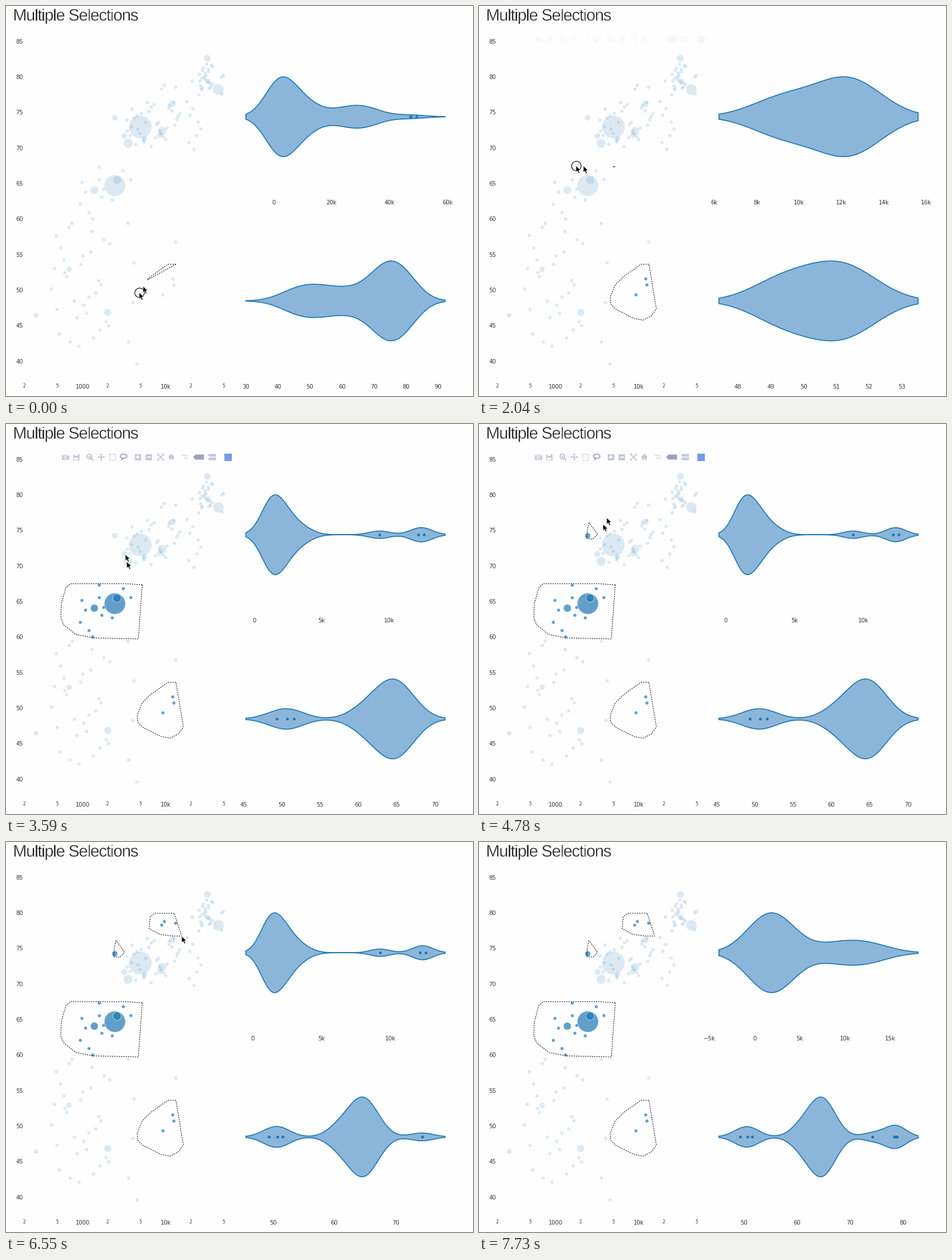
Recreate the animation shown at these times as a matplotlib script. Size 819 by 684 pixels, loop 8.37 s.

```python
import numpy as np
import matplotlib.pyplot as plt
from matplotlib.animation import FuncAnimation
from matplotlib.collections import PatchCollection
from matplotlib.patches import Circle, Ellipse, PathPatch, Polygon, Rectangle
from matplotlib.path import Path
from matplotlib.textpath import TextPath
from matplotlib.transforms import Affine2D, Bbox

W, H, LOOP, FRAMES = 819, 684, 8370, 186
TICK = LOOP // FRAMES
BG, INK, BLUE = "#fefefe", "#333333", "#1f77b4"
SLATE, ACCENT = "#444e84", "#6f96e0"
LEFT, RIGHT, HALF = 420.7, 770, 70   # violin extent
EDGE0, EDGE1 = 402, 789              # violin axis extent

# The screen refreshes in bursts of even steps.
BURSTS = [(0, 120), (270, 740), (1090, 1810), (1930, 2760), (2880, 3710),
          (3830, 4660), (4780, 5600), (5720, 6310), (6550, 6780), (7020, 7730)]
STEPS = np.concatenate([np.linspace(a, b, round((b - a) / 118) + 1)
                        for a, b in BURSTS])

# ---- data: income (k), life expectancy, radius ----
BUBBLES = [(4.959, 72.96, 20), (2.452, 64.698, 18.5), (2.606, 65.483, 7.3),
           (1.391, 64.062, 6.8), (42.95, 78.24, 9.4), (3.541, 70.65, 8),
           (9.066, 72.39, 7.3), (31.66, 82.6, 6), (11.98, 76.2, 5.6),
           (3.19, 71.69, 5.2), (2.442, 74.249, 5), (2.014, 46.86, 6.3),
           (.691, 52.95, 4.7), (32.17, 79.4, 4.8), (.278, 46.46, 4.2),
           (8.458, 71.78, 4.6), (5.581, 71.34, 4.6)]
SMALL = [(9.27, 49.339), (12.154, 51.579), (12.57, 50.728), (.944, 62.069),
         (.986, 65.152), (1.091, 63.785), (1.202, 60.916), (1.328, 60.022),
         (1.593, 67.297), (1.598, 65.528), (1.713, 63.062), (1.803, 64.164),
         (2.281, 62.698), (3.096, 66.803), (3.822, 65.554), (8.948, 78.273),
         (9.645, 78.782), (13.172, 78.553), (13.206, 56.735), (4.513, 39.613),
         (47.14, 79.97), (47.31, 77.59), (49.36, 80.2)]
# Count, life span, log10 income span.
CLOUDS = [(31, 42.1, 59.4, -.38, .34), (4, 42.7, 59.4, .52, .64),
          (21, 70.2, 76.4, .52, .9), (14, 71.2, 76.4, .9, 1.18),
          (11, 69.8, 79.4, 1.25, 1.45), (21, 78.2, 81.8, 1.4, 1.57)]
rng = np.random.default_rng(7)


def cloud(n, low, high, poor, rich):
    spread = (rng.permutation(n) + rng.random(n)) / n
    return np.c_[10 ** (poor + (rich - poor) * spread),
                 np.linspace(low, high, n), np.full(n, 3)]


DATA = np.vstack([BUBBLES, [(*p, 3) for p in SMALL]] + [cloud(*c) for c in CLOUDS])
GDP, LIFE, RADIUS = DATA.T
XY = np.c_[134 + 146 * np.log10(GDP), 62 + 12.467 * (85 - LIFE)]

# ---- lassos: press, release, leave, corners ----
LASSOS = [
    (-440, 600, 1100, [(298, 453), (284, 453), (253, 475), (239, 489), (230, 511),
                       (231, 523), (240, 532), (272, 548), (288, 551), (303, 543),
                       (311, 531)]),
    (1905, 2615, 2985, [(239, 282), (208, 280), (113, 280), (105, 287), (97, 315),
                        (96, 340), (101, 352), (122, 369), (152, 375), (232, 377)]),
    (4020, 4520, 4570, [(193, 173), (190, 185), (189, 201), (200, 202), (208, 193)]),
    (5720, 6170, 6560, [(295, 125), (261, 125), (253, 131), (251, 152), (270, 162),
                        (292, 165), (308, 165)]),
]
EXIT = (7500, (790, 690))
LAG = 135                      # the drawn line trails the pointer
LEAVES = np.array([lasso[2] for lasso in LASSOS])
# Where the pointer heads after each lasso, and when it arrives.
GOALS = [(lasso[0], lasso[3][0]) for lasso in LASSOS[1:]] + [EXIT]


def walk(corners, frac):
    """Corners passed after covering a fraction of the path, then the tip."""
    pts = np.array(corners, float)
    run = np.r_[0, np.cumsum(np.hypot(*np.diff(pts, axis=0).T))]
    s = np.clip(frac, 0, 1) * run[-1]
    tip = [np.interp(s, run, pts[:, 0]), np.interp(s, run, pts[:, 1])]
    return np.vstack([pts[run < s], tip])


def pointer(t):
    for (press, release, leave, corners), (arrive, goal) in zip(LASSOS, GOALS):
        if t < leave:
            pos = walk(corners, (t - press) / (release - press))[-1]
            return pos, t < release
        if t < arrive:
            u = (t - leave) / (arrive - leave)
            pos = np.array(corners[-1]) * (1 - u) + np.array(goal) * u
            return pos - (0, 30 * np.sin(np.pi * u)), False
    return np.array(EXIT[1], float), False


def toolbar_glow(t):
    """Shown from leaving a lasso until the next press, then a short fade."""
    for leave, (arrive, _) in zip(LEAVES, GOALS):
        if leave <= t < arrive + 155:
            return min(1, 1 - (t - arrive) / 155)
    return 0


def inside(corners):
    return Path(np.vstack([corners, corners[:1]])).contains_points(XY)


# ---- stage ----
fig = plt.figure(figsize=(W / 72, H / 72), dpi=72, facecolor=BG)
ax = fig.add_axes([0, 0, 1, 1])
ax.set(xlim=(0, W), ylim=(H, 0))
ax.axis("off")


def label(x, y, s, size=10, ha="center", **kw):
    return ax.text(x, y + size * .36, s, size=size, ha=ha, va="baseline",
                   color=INK, family="DejaVu Sans", **kw)


def heading(s, x, base, size, track):
    def glyph(c):
        return TextPath((0, 0), c, size=size, prop={"family": "Liberation Sans"})

    def span(c):
        return glyph(c).get_extents().width

    for c in s:
        if c != " ":
            place = Affine2D().scale(1, -1).translate(x, base) + ax.transData
            ax.add_patch(PathPatch(glyph(c), fc="#222222", ec=BG, lw=.45,
                                   transform=place))
        x += span(f"|{c}|") - span("||") + track


def scatter_axes():
    for k in range(10):
        label(29.8, 62 + 62.35 * k, str(85 - 5 * k), ha="right")
    for decade, name in enumerate(("1000", "10k")):
        label(134 + 146 * decade, 667, name)
    for decade in (-1, 0, 1):
        for d in (2, 5):
            label(134 + 146 * (decade + np.log10(d)), 666, str(d), 7.5)


heading("Multiple Selections", 12.3, 25.6, 29, -1.2)
scatter_axes()
dots = PatchCollection([Circle(p, r) for p, r in zip(XY, RADIUS)], lw=.8)
ax.add_collection(dots)


class Violin:
    """One density plot per selection stage; a stage is everything or the
    union of the first few lassos."""

    def __init__(self, mid, tick_y, values, delay, suffix=""):
        self.mid, self.tick_y, self.delay, self.suffix = mid, tick_y, delay, suffix
        self.stages = []
        picked = np.zeros(len(XY), bool)
        self.add_stage(values)
        for lasso in LASSOS:
            picked |= inside(lasso[3])
            self.add_stage(values[picked])
        self.body = ax.add_patch(Polygon(self.stages[0][0], fc="#8bb6da",
                                         ec=BLUE, lw=1.7))
        self.far, = ax.plot([], [], "o", color=BLUE, ms=5, mew=0)

    def add_stage(self, v):
        q1, q3 = np.quantile(v, (.25, .75), method="hazen")
        iqr = q3 - q1
        band = 1.059 * min(v.std(ddof=1), iqr / 1.349) * len(v) ** -.2
        lo, hi = v.min() - 2 * band, v.max() + 2 * band
        unit = (RIGHT - LEFT) / (hi - lo)

        grid = np.linspace(lo, hi, 220)
        d = np.exp(-((grid[:, None] - v) / band) ** 2 / 2).sum(axis=1)
        d *= HALF / d.max()
        xs = LEFT + (grid - lo) * unit
        shape = np.r_[np.c_[xs, self.mid - d], np.c_[xs, self.mid + d][::-1]]

        far = v[(v < q1 - 1.5 * iqr) | (v > q3 + 1.5 * iqr)]
        self.stages.append((shape, LEFT + (far - lo) * unit,
                            self.ticks(lo, hi, unit)))

    def ticks(self, lo, hi, unit):
        step = next(s for s in (1, 2, 5, 10, 20, 50) if s >= (hi - lo) / 6.4)
        first = int(np.ceil((lo - (LEFT - EDGE0) / unit) / step)) * step
        last = lo + (EDGE1 - LEFT) / unit
        clip = Bbox.from_extents(EDGE0, 0, EDGE1, H)
        out = []
        for n in range(first, int(np.floor(last)) + 1, step):
            name = f"{n}{self.suffix if n else ''}".replace("-", "\u2212")
            out.append(label(LEFT + (n - lo) * unit, self.tick_y, name,
                             clip_box=clip, clip_on=True))
        return out

    def show(self, t):
        now = int((t >= LEAVES + self.delay).sum())
        shape, far, _ = self.stages[now]
        self.body.set_xy(shape)
        self.far.set_data(far, np.full(len(far), self.mid))
        for k, (_, _, names) in enumerate(self.stages):
            for name in names:
                name.set_visible(k == now)


violins = [Violin(194.2, 344.5, GDP, 150, "k"), Violin(517.2, 667, LIFE, 215)]

# ---- toolbar ----
icons = []


def icon(artist, alpha=.3):
    ax.add_artist(artist)
    icons.append((artist, alpha))


def box(x, y, w, h, color=SLATE, alpha=.3):
    icon(Rectangle((x, y), w, h, fc=color, ec="none"), alpha)


def gap(x, y, w, h):
    box(x, y, w, h, BG, 1)


def poly(*pts, alpha=.3):
    icon(Polygon(pts, fc=SLATE, ec="none"), alpha)


def stroke(xs, ys, lw=1.6, alpha=.3, **kw):
    icon(plt.Line2D(xs, ys, color=SLATE, lw=lw, solid_capstyle="butt", **kw), alpha)


def tag(x, y, w, h, alpha=.3):
    poly((x, y), (x + h / 2, y - h / 2), (x + w, y - h / 2), (x + w, y + h / 2),
         (x + h / 2, y + h / 2), alpha=alpha)


def toolbar():
    # camera and disk
    box(98, 54.5, 12.5, 8.7)
    box(101.5, 52.8, 5.5, 1.7)
    icon(Circle((104.2, 58.8), 2.9, fc=BG, ec="none"), 1)
    icon(Circle((104.2, 58.8), 1.7, fc=SLATE, ec="none"))
    box(117.5, 52.5, 11, 11)
    gap(120, 53.3, 5.5, 3)
    gap(119.3, 59, 7.4, 3.6)
    # magnifier
    icon(Circle((146.3, 57), 4, fill=False, ec=SLATE, lw=2.2))
    stroke([149.2, 153], [60, 63.8], 2.6)
    stroke([144.4, 148.2], [57, 57], 1.2)
    stroke([146.3, 146.3], [55.1, 58.9], 1.2)
    # four-way arrow and four-way expand
    for a in range(4):
        turn = Affine2D().rotate(a * np.pi / 2)
        arm = (turn + Affine2D().translate(167, 58)).transform
        poly(*arm([(6.5, 0), (3.6, -2.4), (3.6, 2.4)]))
        stroke(*arm([(0, 0), (4, 0)]).T)
        arm = (turn + Affine2D().translate(271, 58)).transform
        poly(*arm([(6, 6), (2, 6), (6, 2)]))
        stroke(*arm([(0, 0), (4, 4)]).T)
    # frame and lasso
    icon(Rectangle((181.5, 53), 10.5, 10.5, fill=False, ec=SLATE, lw=1.5,
                   ls=(0, (1.4, 1))))
    icon(Ellipse((206.3, 56.6), 11.5, 7.6, fill=False, ec=SLATE, lw=1.8), .52)
    stroke([203.2, 204.5, 202], [59.5, 61.3, 64], 1.6, .52)
    # plus and minus
    for x in (225.7, 245.2):
        box(x, 52.5, 11, 11)
        gap(x + 2.5, 57.2, 6, 1.7)
    gap(230.4, 55, 1.7, 6)
    # house
    poly((283.6, 58.3), (290, 52.5), (296.4, 58.3))
    box(285.7, 58.3, 8.6, 5)
    gap(288.9, 59.8, 2.2, 3.5)
    # dotted corner and tags
    stroke([308.5, 318], [54.5, 54.5], ls=(0, (1.6, .9)))
    stroke([317, 317], [56.5, 63.5], ls=(0, (1.2, .9)))
    box(311.5, 58.5, 2.2, 2.2)
    tag(328, 58, 19.3, 8.9, .52)
    for y in (54.9, 61.2):
        tag(354, y, 14.3, 4.8)
    box(382.5, 52, 13, 13, ACCENT, .95)


toolbar()

# ---- moving parts ----
outlines = [ax.add_patch(Polygon([(0, 0)] * 3, fill=False, ec="black", lw=1.05,
                                 ls=(0, (2, 1.8)), joinstyle="round"))
            for _ in LASSOS]
ring = ax.add_patch(Circle((0, 0), 8.3, fill=False, ec="black", lw=1.1))
ARROW = np.array([(0, 0), (0, 11.6), (2.7, 9.2), (4.7, 13.6), (6.8, 12.7),
                  (4.9, 8.4), (8.6, 8.2)])
arrows = [ax.add_patch(Polygon(ARROW, fc="black", ec="white", lw=.8))
          for _ in range(2)]
RGB = np.array([31, 119, 180]) / 255


def paint_dots(picked):
    alpha = np.where(picked, .7, .15)[:, None]
    n = len(alpha)
    dots.set_facecolor(np.hstack([np.tile(RGB, (n, 1)), alpha]))
    dots.set_edgecolor(np.hstack([np.ones((n, 3)), alpha]))


def paint_pointer(t, before):
    (pos, held), (old, _) = pointer(t), pointer(before)
    ring.set_center(pos + (.7, .7))
    ring.set_visible(held)
    back = old - pos
    dist = np.hypot(*back)
    arrows[0].set_xy(ARROW + pos + back * min(1, 13 / max(dist, 1e-6)))
    arrows[0].set_visible(dist > 3)
    arrows[1].set_xy(ARROW + pos)


def draw(i):
    k = np.searchsorted(STEPS, i * TICK + TICK - 1, "right") - 1
    t = STEPS[k]
    before = STEPS[k - 1] if k else -118

    picked = np.zeros(len(XY), bool)
    for shape, (press, release, _, corners) in zip(outlines, LASSOS):
        trail = walk(corners, (t - LAG - press) / (release - press))
        shape.set_visible(len(trail) > 1)
        if len(trail) > 1:
            shape.set_xy(trail)
        if len(trail) > 2:
            picked |= inside(trail)
    paint_dots(picked)

    for v in violins:
        v.show(t)

    glow = toolbar_glow(t)
    for artist, alpha in icons:
        artist.set_visible(glow > 0)
        artist.set_alpha(alpha * glow)

    paint_pointer(t, before)
    return []


anim = FuncAnimation(fig, draw, frames=FRAMES, interval=TICK, repeat=True,
                     repeat_delay=0, init_func=lambda: draw(0), blit=False)
plt.show()
```
